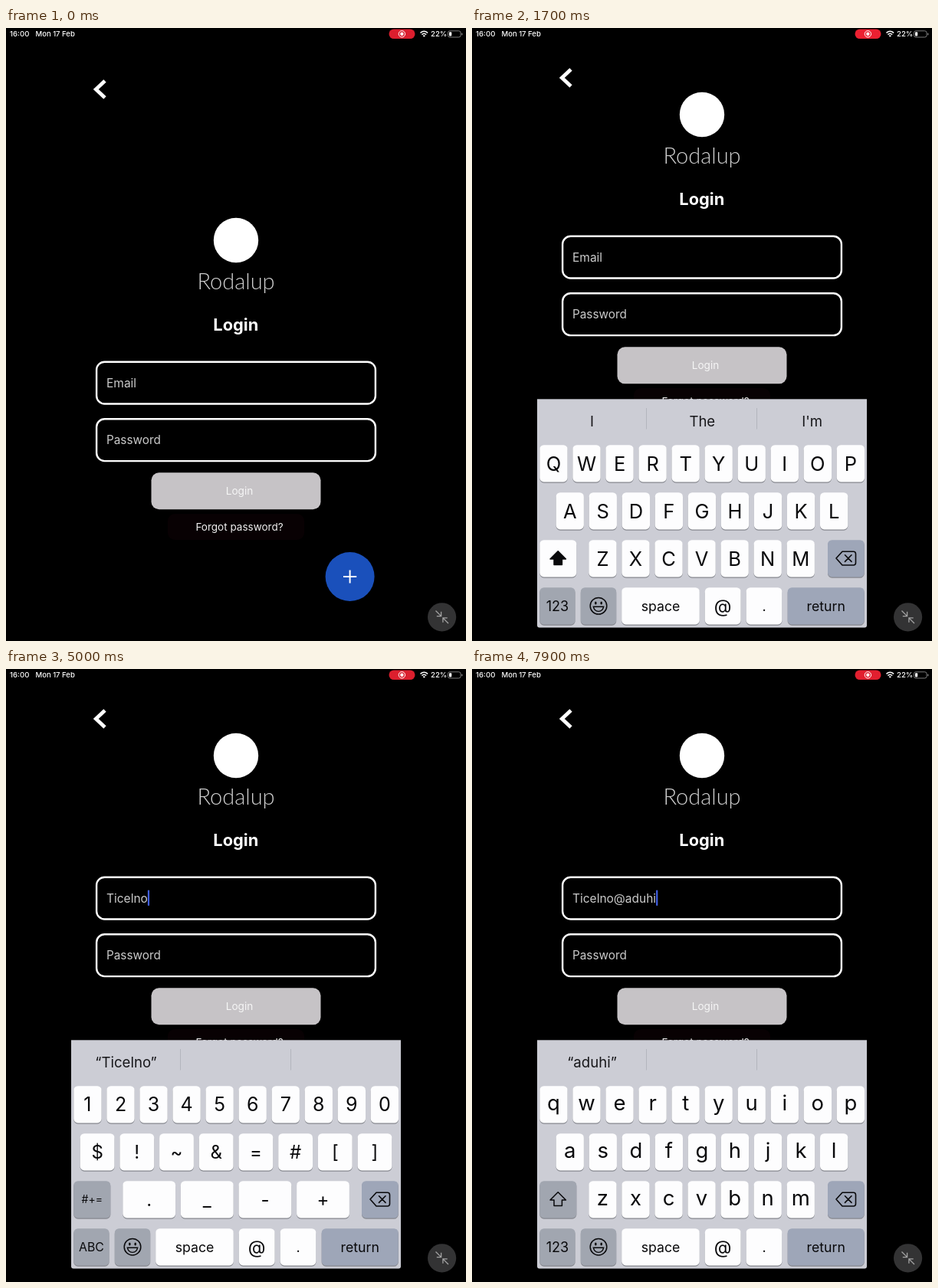
An HTML page that plays this animation: 600x800 px, repeating every 8 s.

```html
<!DOCTYPE html>
<html lang="en">
<head>
<meta charset="utf-8">
<title>Login</title>
<style>
html, body { margin: 0; width: 100%; height: 100%; overflow: hidden; background: #000; }
svg { display: block; width: 100%; height: 100%; font-family: Inter, "Liberation Sans", sans-serif; }
</style>
</head>
<body>
<svg id="stage" viewBox="0 0 600 800"></svg>
<script>
const LOOP = 8000;
const stage = document.getElementById("stage");

function el(parent, tag, attrs = {}, content) {
  const node = document.createElementNS("http://www.w3.org/2000/svg", tag);
  for (const key in attrs) node.setAttribute(key, attrs[key]);
  if (content !== undefined) node.textContent = content;
  parent.appendChild(node);
  return node;
}
const group = parent => el(parent, "g");
const rect = (parent, x, y, width, height, rx, attrs) =>
  el(parent, "rect", { x, y, width, height, rx, ...attrs });
const path = (parent, d, attrs) => el(parent, "path", { d, ...attrs });
const line = (parent, d, stroke, width, attrs) =>
  path(parent, d, { fill: "none", stroke, "stroke-width": width, ...attrs });
// y is the middle of the capitals
const text = (parent, str, x, y, size, fill, attrs) =>
  el(parent, "text", { x, y: y + size * 0.364, "font-size": size, fill, "text-anchor": "middle", ...attrs }, str);
const left = { "text-anchor": "start" };
const show = (node, on) => node.setAttribute("display", on ? "inline" : "none");
const shift = (node, y) => node.setAttribute("transform", `translate(0 ${y.toFixed(2)})`);

const defs = el(stage, "defs");
const soft = el(defs, "filter", { id: "soft", x: "-30%", y: "-30%", width: "160%", height: "160%" });
el(soft, "feDropShadow", { dx: 0, dy: 1, stdDeviation: 2.5, "flood-color": "#000", "flood-opacity": 0.4 });
rect(el(defs, "clipPath", { id: "panel" }), 85, 400, 430, 382.5, 3);
rect(stage, 0, 0, 600, 800, 0, { fill: "#000" });

// Login form
const chevron = line(stage, "M129 69 L117.3 80 L129 91", "#fff", 4.8);
const form = group(stage);
el(form, "circle", { cx: 300, cy: 277, r: 29.2, fill: "#fff" });
text(form, "Rodalup", 300, 330.5, 29, "#d0d0d0", { "font-family": "Lato, sans-serif", "font-weight": 300 });
text(form, "Login", 299.8, 387, 21.8, "#fff", { "font-weight": 700 });
for (const y of [435.7, 510.3])
  rect(form, 118.1, y, 363.8, 54.8, 10.5, { fill: "none", stroke: "#fff", "stroke-width": 2.4 });
const marked = rect(form, 128, 452, 18, 23, 0, { fill: "#0b1a30" });
const email = text(form, "Email", 131, 463, 15.5, "#cbcbcb", left);
const caret = rect(form, 131, 452.4, 2.2, 20.6, 1, { fill: "#4260e4" });
text(form, "Password", 131, 537.6, 15.3, "#cbcbcb", left);
rect(form, 189.5, 580.3, 221, 48, 10, { fill: "#c6c3c6" });
text(form, "Login", 304.5, 604.2, 13.6, "#f6f6f6");
rect(form, 211, 634, 178, 34, 9, { fill: "#080103" });
text(form, "Forgot password?", 304.5, 650.6, 13.5, "#f0f0f0");

// Floating button, later covered by the keyboard
el(stage, "circle", { cx: 448.6, cy: 716, r: 32, fill: "#1a50bb" });
line(stage, "M440 716 H457.2 M448.6 707.4 V724.6", "#fff", 2);

// Keyboard
const clip = el(stage, "g", { "clip-path": "url(#panel)" });
const board = group(clip);
rect(board, 85, 484.3, 430, 299, 0, { fill: "#cccdd5" });
const dividers = line(board, "M227.5 496 V523.5 M371.5 496 V523.5", "#b3b5bd", 1);
const choice = rect(board, 228, 491, 143.5, 44, 5, { fill: "#e9eaee" });
const words = [156.5, 300.3, 443.6].map(x => text(board, "", x, 513.3, 18.6, "#17171a"));

const WHITE = "#fdfdfe", GREY = "#a1a6b0", BLUE_GREY = "#9ea6b8", INK = "#09090b";
const KEY_H = 48.2, ROWS = [544.2, 606.2, 668.2, 730.2];
function key(parent, x, y, w, fill, label, size = 17.7, lift = 0) {
  rect(parent, x, y + 1.3, w, KEY_H, 5.5, { fill: "#86888f" });
  const face = rect(parent, x, y, w, KEY_H, 5.5, { fill });
  if (label) text(parent, label, x + w / 2, y + KEY_H / 2 - lift, size, INK);
  return face;
}
function row(parent, labels, x, y, pitch, w, size, lift) {
  [...labels].forEach((label, i) => key(parent, x + i * pitch, y, w, WHITE, label, size, lift));
}

const LETTERS = ["qwertyuiop", "asdfghjkl", "zxcvbnm"];
const STARTS = [88.3, 109.6, 152.3], PITCH = 43.05, KEY_W = 36.3;
const ARROW = "M112.2 682.8 L122.4 693 H117.4 V700.6 H107 V693 H102 Z";
function letterLayout(upper) {
  const g = group(board);
  LETTERS.forEach((keys, i) =>
    row(g, upper ? keys.toUpperCase() : keys, STARTS[i], ROWS[i], PITCH, KEY_W, upper ? 25.5 : 27.5, upper ? 0 : 2));
  key(g, 88.3, ROWS[2], 48, upper ? WHITE : GREY);
  path(g, ARROW, { fill: upper ? INK : "none", stroke: INK, "stroke-width": 1.5, "stroke-linejoin": "round" });
  key(g, 88.3, ROWS[3], 46.2, GREY, "123", 18);
  return g;
}
function numberLayout() {
  const g = group(board);
  row(g, "1234567890", 88.3, ROWS[0], PITCH, KEY_W, 25);
  row(g, "$!~&=#[]", 96.7, ROWS[1], 51.7, 44.8, 24);
  row(g, "._-+", 152.3, ROWS[2], 75.6, 68.8, 24);
  key(g, 88.3, ROWS[2], 48, GREY, "#+=", 14);
  key(g, 88.3, ROWS[3], 46.2, GREY, "ABC", 15.8);
  return g;
}
const layouts = { upper: letterLayout(true), lower: letterLayout(false), numbers: numberLayout() };

key(board, 464, ROWS[2], 47.7, BLUE_GREY);
line(board, "M483 683.2 H497.5 Q500.5 683.2 500.5 686.2 V698 Q500.5 701 497.5 701 H483 L475 692 Z M486.5 687.8 L495 696.4 M495 687.8 L486.5 696.4",
  INK, 1.6, { "stroke-linejoin": "round", "stroke-linecap": "round" });
key(board, 141.8, ROWS[3], 46.4, GREY);
el(board, "circle", { cx: 165, cy: 754.2, r: 10.8, fill: "none", stroke: INK, "stroke-width": 1.5 });
for (const cx of [161.3, 168.7]) el(board, "ellipse", { cx, cy: 750.6, rx: 1.3, ry: 2, fill: INK });
line(board, "M158.3 755.2 H171.7 Q170.5 761.4 165 761.4 Q159.5 761.4 158.3 755.2 Z", INK, 1.4);
key(board, 195.2, ROWS[3], 101.6, WHITE, "space");
const atKey = key(board, 303.8, ROWS[3], 46.8, WHITE, "@", 23.5);
key(board, 357.6, ROWS[3], 46.8, WHITE, ".", 18);
key(board, 411.7, ROWS[3], 100, BLUE_GREY, "return");

// Enlarged key shown while a letter is held
const popup = group(stage);
path(popup, "M-22.7 -74 H22.7 Q32.7 -74 32.7 -64 V-33 C32.7 -17 18.2 -18 18.2 -3 V42.5 Q18.2 48.5 12.2 48.5 H-12.2 Q-18.2 48.5 -18.2 42.5 V-3 C-18.2 -18 -32.7 -17 -32.7 -33 V-64 Q-32.7 -74 -22.7 -74 Z",
  { fill: WHITE, filter: "url(#soft)" });
path(popup, "M-12.2 -12.7 Z", { transform: "translate(0 0)" }).remove();
const popupLetter = text(popup, "", 0, -42, 40, INK);

// Status bar and corner button
const status = { "font-weight": 500 };
text(stage, "16:00", 5, 7.8, 9.6, "#fff", { ...left, ...status });
text(stage, "Mon 17 Feb", 38.5, 7.8, 9.5, "#fff", { ...left, ...status });
const pill = rect(stage, 499.5, 1.5, 34, 12.6, 6.3);
el(stage, "circle", { cx: 516.4, cy: 7.8, r: 4.2, fill: "none", stroke: "#fff", "stroke-width": 1 });
el(stage, "circle", { cx: 516.4, cy: 7.8, r: 2.2, fill: "#fff" });
line(stage, "M540.5 6.4 Q545.3 2 550.1 6.4 M542.4 8.6 Q545.3 6 548.2 8.6", "#fff", 1.5);
path(stage, "M543.6 10 Q545.3 8.6 547 10 L545.3 11.8 Z", { fill: "#fff" });
text(stage, "22%", 554, 7.8, 9.6, "#fff", { ...left, ...status });
rect(stage, 576.5, 3.8, 16.5, 8.2, 2.4, { fill: "none", stroke: "#8a8a8a", "stroke-width": 0.9 });
rect(stage, 578, 5.2, 3.2, 5.4, 1, { fill: "#fff" });
rect(stage, 594.2, 6.4, 1.2, 3, 0.6, { fill: "#8a8a8a" });
el(stage, "circle", { cx: 568.6, cy: 768.8, r: 18.6, fill: "#333334" });
line(stage, "M560.5 760.5 L567.4 767.4 M567.6 761.8 V767.6 H561.8 M577 777 L570.1 770.1 M569.9 775.7 V769.9 H575.7", "#a3a3a3", 1.3);

// Timeline
const FOCUS = 978, FORM_LAG = 13.6, HOLD = 150, NUMBERS_ON = 4750, NUMBERS_OFF = 5950;
const TYPED = "Ticelno@aduhi";
const TIMES = [2200, 2600, 3000, 3300, 3700, 4050, 4400, 5650, 6350, 6800, 7150, 7500, 7800];

function spring(ms) {
  const u = Math.max(0, ms) * 0.01826;
  return 1 - (1 + u) * Math.exp(-u);
}
function suggestions(str) {
  if (!str) return ["I", "The", "I'm"];
  const word = str.split("@").pop();
  const rest = str.length === 1 ? ["To", "The"] : str.length === 2 ? ["To", "Right"] : ["", ""];
  return [word && `“${word}”`, ...rest];
}
function placePopup(letter) {
  const lower = letter.toLowerCase();
  const r = LETTERS.findIndex(keys => keys.includes(lower));
  const x = STARTS[r] + LETTERS[r].indexOf(lower) * PITCH + KEY_W / 2;
  popup.setAttribute("transform", `translate(${x} ${ROWS[r]})`);
  popupLetter.textContent = letter;
}

function draw(t) {
  const rise = spring(t - FOCUS), follow = spring(t - FOCUS - FORM_LAG);
  shift(board, 298.5 * (1 - rise));
  shift(form, -164 * follow);
  shift(chevron, -15 * follow);
  show(clip, t > FOCUS);

  const count = TIMES.filter(at => at <= t).length;
  const str = TYPED.slice(0, count);
  email.textContent = str || "Email";
  const width = str ? email.getComputedTextLength() : 0;
  const since = t - (count ? TIMES[count - 1] : FOCUS);
  caret.setAttribute("x", 131 + width);
  show(caret, t > FOCUS && since % 1000 < 620);

  const corrected = count === 2;
  show(marked, corrected);
  marked.setAttribute("width", width + 4);
  show(choice, corrected);
  show(dividers, !corrected);
  suggestions(str).forEach((word, i) => { words[i].textContent = word; });

  const numbers = t >= NUMBERS_ON && t < NUMBERS_OFF;
  const active = numbers ? "numbers" : count ? "lower" : "upper";
  for (const name in layouts) show(layouts[name], name === active);

  const next = TYPED[count] || "";
  const held = next && TIMES[count] - t <= HOLD;
  const lifted = held && next !== "@";
  atKey.setAttribute("fill", held && next === "@" ? GREY : WHITE);
  show(popup, lifted);
  if (lifted) placePopup(next);

  const glow = 0.5 - 0.5 * Math.sin(t / 1000 * Math.PI);
  const mix = (a, b) => Math.round(a + (b - a) * glow);
  pill.setAttribute("fill", `rgb(${mix(200, 240)},${mix(29, 32)},${mix(42, 50)})`);
}

function tick() {
  draw(performance.now() % LOOP);
  requestAnimationFrame(tick);
}
tick();
</script>
</body>
</html>
```
